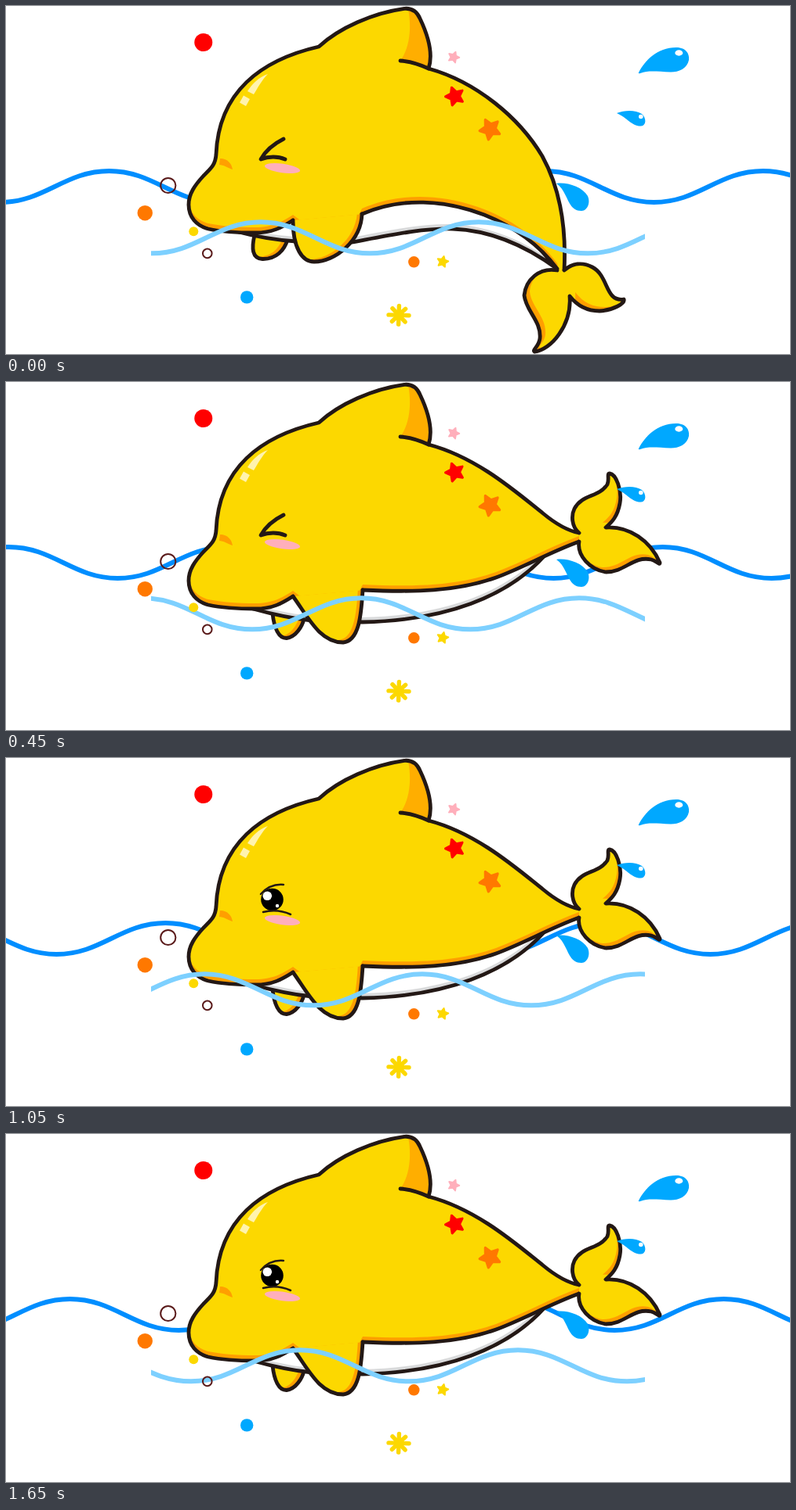
These frames come from a looping animation (1000x445 px, 1.8 s). An HTML page:

```html
<!DOCTYPE html>
<html lang="en">
<head>
<meta charset="utf-8">
<title>Swimming dolphin</title>
<style>
  html, body { margin: 0; height: 100%; overflow: hidden; background: #fff; }
  svg { display: block; width: 100%; height: 100%; }
  .ink { fill: none; stroke: #231815; stroke-width: 4.8; stroke-linecap: round; stroke-linejoin: round; }
  .thin { stroke-width: 2.5; }
  .wave { fill: none; stroke-width: 6; }
</style>
</head>
<body>
<svg id="stage" viewBox="0 0 1000 445"></svg>
<script>
const YELLOW = '#fcd800', ORANGE = '#ff9f00', BLUE = '#00a8ff';
const STEP = 150, STEPS = 12, PERIOD = 278;

const HEAD = 'M366 274C352 283 340 290 318 290C295 290 272 288 258 285C243 281 233 270 233 254' +
  'C233 240 241 229 252 217C262 207 267 203 268 190C271 110 325 69 399 52' +
  'C425 28 468 9 508 3.400C518 2.400 524 7 528 16C538 37 545 62 539 80';
const FIN_BASE = 'M503 70C516 71 528 75 539 80';

const level = {
  back: 'C600 96 650 140 685 168C703 183 716 190 731 193',
  tailJoin: 'L745 196L745 201L731 204',
  edge: 'C693 218 660 237 625 250C575 268 520 269 455 266',
  belly: 'M315 290C340 297 360 302 390 305L455 307C560 305 640 275 688 221L620 200L400 240Z',
  farFlipper: 'M340 296C342 315 348 328 358 327.5C370 326 378 312 380 303',
  flipper: 'M366 274C385 300 400 333 430 333C450 331 453 300 455 266',
  flukes: 'M731 193C721 185 721 170 725 162C735 143 756 148 767 131C770 124 766 117 770 117' +
    'C778 118 786 138 783 155C780 172 773 179 765 186C795 184 822 203 834 231' +
    'C834 235 830 229 823 227C800 222 790 243 765 243C745 240 728 222 731 204',
  flukeMove: '', flukeShade: [-4, -6]
};

const down = {
  back: 'C600 97 655 143 684 192C706 232 715 280 712 338',
  tailJoin: 'L714 350L706 350L703 336',
  edge: 'C680 305 650 283 610 267C560 248 505 244 454 266',
  belly: 'M293 288C315 294 340 299 370 301L437 303C490 293 530 284 570 285C620 287 665 308 703 336L620 240L400 240Z',
  farFlipper: 'M317 293C313 310 314 323 327 323.5C345 324 355 312 359 299',
  flipper: 'M366 274C366 310 378 327 393 327C420 327 453 300 454 266',
  flukes: 'M703 338C680 334 663 350 661 370C663 390 683 403 681 425C680 435 671 440 674 442' +
    'C695 440 722 408 719 371C730 385 742 390 757 390C775 389 790 380 788 375' +
    'C764 379 769 345 748 334C735 327 722 329 712 338',
  flukeMove: '', flukeShade: [7, -5]
};

const up = {
  ...level,
  back: 'C590 95 635 127 665 126C690 125 704 110 714 91',
  tailJoin: 'L716 84L724 86L726 98',
  edge: 'C715 145 695 188 660 220C615 264 530 272 455 266',
  belly: 'M315 290C340 297 360 302 390 305L455 307C560 305 640 275 676 205L620 190L400 240Z',
  flukeMove: 'translate(720 94) rotate(-60) translate(-731 -198)'
};

const fill = (d, color, extra = '') => `<path d="${d}" fill="${color}" ${extra}/>`;
const ink = (d, cls = '') => `<path d="${d}" class="ink ${cls}"/>`;
const dot = (x, y, r, color) => `<circle cx="${x}" cy="${y}" r="${r}" fill="${color}"/>`;
const ring = (x, y, r) => `<circle cx="${x}" cy="${y}" r="${r}" fill="none" stroke="#5a1a1a" stroke-width="2"/>`;

// A shape whose rim, on the side away from the shift, keeps the shade colour.
let clipCount = 0;
function shaded(d, [dx, dy], color = YELLOW, shade = ORANGE) {
  const id = 'clip' + clipCount++;
  return `<clipPath id="${id}"><path d="${d}"/></clipPath><g clip-path="url(#${id})">` +
    fill(d, shade) + fill(d, color, `transform="translate(${dx} ${dy})"`) + '</g>';
}

function dolphin(pose) {
  const { back, tailJoin, edge, belly, farFlipper, flipper, flukes, flukeMove, flukeShade } = pose;
  const edgeStart = 'M' + tailJoin.split('L').pop();
  return '<g>' +
    shaded(farFlipper, [-6, -3]) + ink(farFlipper) +
    shaded(belly, [-1, -6], '#fff', '#d9dadb') + ink(belly) +
    shaded(HEAD + back + tailJoin + edge + 'L442 290L390 292Z', [0, -7]) +
    fill('M513 4C518 30 514 55 503 70C516 71 528 75 539 80C545 62 538 37 528 16C524 6 518 3 513 4', '#ffae00') +
    ink(HEAD + back) + ink(FIN_BASE) + ink(edgeStart + edge) +
    `<g transform="${flukeMove}">${shaded(flukes, flukeShade)}${ink(flukes)}</g>` +
    shaded(flipper, [-6, -3]) + ink(flipper) + '</g>';
}

function star(x, y, radius, turn, color) {
  const points = Array.from({ length: 10 }, (_, i) => {
    const a = turn * Math.PI / 180 + i * Math.PI / 5, r = i % 2 ? radius * 0.5 : radius;
    return [x + r * Math.cos(a), y + r * Math.sin(a)].map(v => v.toFixed(1));
  });
  return `<polygon points="${points.join(' ')}" fill="${color}" stroke="${color}" stroke-width="${radius * 0.25}" stroke-linejoin="round"/>`;
}

function wavePath(crestY) {
  let d = `M${-3 * PERIOD} ${crestY}`;
  for (let i = 0; i < 9; i++) d += 'c57 0 82 40 139 40c57 0 82 -40 139 -40';
  return d;
}

const face =
  fill('M273 195C283 195 288 202 289 209C283 207 277 203 272 203Z', ORANGE) +
  fill('M334 87C322 91 313 101 308 109L316 113C321 105 326 95 334 87M303 114.5L311 119L306 128L298 123.5Z', '#fff3ae') +
  '<ellipse cx="352.5" cy="207.5" rx="22.8" ry="5.7" transform="rotate(8 352.5 207.5)" fill="#ffafbb"/>' +
  '<g id="eyeOpen">' + dot(339.5, 181, 14.3, '#000') + dot(333.3, 176.3, 5.8, '#fff') + dot(346, 189, 2.2, '#fff') +
  ink('M325 174C333 165 343 161 354 162', 'thin') + ink('M328 197C340 194 352 195 363 200', 'thin') + '</g>' +
  '<g id="eyeClosed">' + ink('M354 170C340 177 330 187 325 196C335 192 347 192 356 196') + '</g>';

const asterisk = [0, 45, 90, 135].map(angle => {
  const arm = angle ? 11.8 : 13;
  return `<path d="M${-arm} 0H${arm}" transform="translate(501 395.3) rotate(${angle + 2})" stroke="${YELLOW}" stroke-width="5.4" stroke-linecap="round"/>`;
}).join('');

const decorations =
  fill('M807 85C815 70 830 53 855 53C868 53 872 62 871 69C869 80 858 84.5 848 84.5C830 84 820 82 809 86Q806 87 807 85', BLUE) +
  '<ellipse cx="858.3" cy="60" rx="5" ry="3.7" fill="#fff"/>' +
  fill('M779 137C790 133 803 133 811 138C817 143 817 153 810 153.5C798 154 793 143 779 137', BLUE) + dot(809.8, 141.5, 2.8, '#fff') +
  fill('M702 227C715 225 735 231 742 243C746 252 741 262 734 262C715 262 718 238 702 227', BLUE) +
  dot(251.8, 46.5, 11.5, '#f00') + dot(177.3, 264.7, 9.7, '#ff7800') + dot(239.3, 288.3, 6, YELLOW) +
  dot(520.3, 327.3, 7.2, '#ff7800') + dot(307.2, 372.4, 8.2, BLUE) +
  ring(206.8, 229.5, 9.6) + ring(256.8, 316.4, 5.8) +
  star(571, 65.5, 7.3, 2, '#ffafbb') + star(572.5, 115.5, 12, 178, '#f00') +
  star(617.5, 157.5, 13.5, 171, '#ff7800') + star(557, 327, 7.3, -5, YELLOW) + asterisk;

const $ = id => document.getElementById(id);
$('stage').innerHTML =
  `<path id="backWave" class="wave" stroke="#008eff" d="${wavePath(211)}"/>` +
  `<g id="poses">${[down, level, up].map(dolphin).join('')}</g>` + face +
  '<clipPath id="frontArea"><path d="M185 260H815V330H185Z"/></clipPath>' +
  `<g clip-path="url(#frontArea)"><path id="frontWave" class="wave" stroke="#7dd0ff" d="${wavePath(276.3)}"/></g>` +
  decorations;

const swing = [0, 1, 2, 1];
const poses = [...$('poses').children];
const show = (node, visible) => node.setAttribute('display', visible ? 'inline' : 'none');

function draw() {
  const step = Math.floor(performance.now() / STEP) % STEPS;
  const drift = 50 * ((step + 2) % STEPS);   // the waves restart two steps before the loop ends
  $('backWave').setAttribute('transform', `translate(${(31.5 + drift) % PERIOD} 0)`);
  $('frontWave').setAttribute('transform', `translate(${(425 - drift) % PERIOD} 0)`);
  poses.forEach((node, i) => show(node, i === swing[step % 4]));
  show($('eyeClosed'), step % 3 === 0);
  show($('eyeOpen'), step % 3 !== 0);
  requestAnimationFrame(draw);
}
draw();
</script>
</body>
</html>
```
